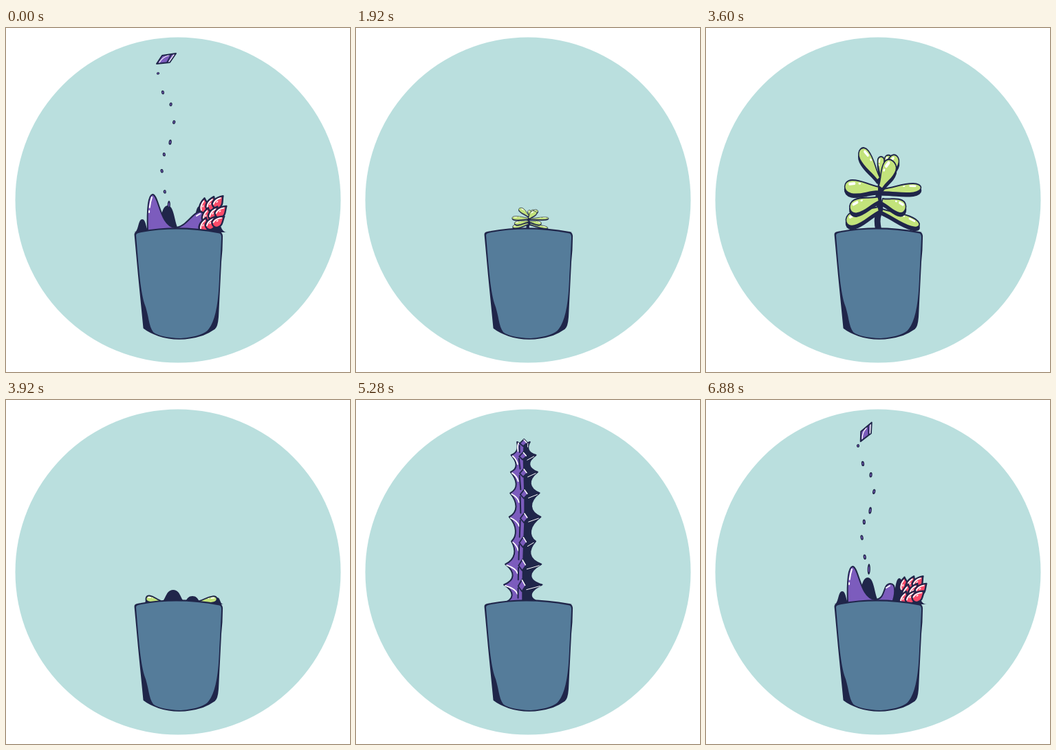
An HTML page with a canvas that plays this animation: 500x500 px, repeating every 6.96 s.

```html
<!DOCTYPE html>
<html lang="en">
<head>
<meta charset="utf-8">
<title>Pot plants</title>
<style>
  html, body { margin: 0; width: 100%; height: 100%; overflow: hidden; background: #fff; }
  canvas { display: block; width: 500px; height: 500px; }
</style>
</head>
<body>
<canvas id="stage" width="500" height="500"></canvas>
<script>
const ctx = document.getElementById('stage').getContext('2d');
const LOOP = 6960, STEP = 80, COUNT = LOOP / STEP;
const INK = '#20264a', RED = '#fb4a68', GREEN = '#c3e37b', PURPLE = '#7c5cbd',
      SKY = '#badfde', POT = '#557c9a', WHITE = '#fff';
const { PI, sin, cos, exp, min, max } = Math;

ctx.lineJoin = ctx.lineCap = 'round';

// ---- easing ----
const clamp = v => min(1, max(0, v));
const smooth = v => (v = clamp(v)) * v * (3 - 2 * v);
const backOut = v => 1 + 2.2 * (v - 1) ** 3 + 1.2 * (v - 1) ** 2;
const spring = n => 1 - exp(-.31 * n) * cos(PI * n / 4);
const swell = (q, from, to) => max(0, sin(PI * clamp((q - from) / (to - from))));

// ---- drawing helpers ----
function paint(fill, stroke, width = 2, path) {
  const args = path ? [path] : [];
  if (fill) { ctx.fillStyle = fill; ctx.fill(...args); }
  if (stroke) { ctx.strokeStyle = stroke; ctx.lineWidth = width; ctx.stroke(...args); }
}

function scaled(sx, sy, y, draw) {
  ctx.save();
  ctx.translate(250, y);
  ctx.scale(sx, sy);
  ctx.translate(-250, -y);
  draw();
  ctx.restore();
}

// Adds a smooth run of points to the current path.
function run(pts) {
  ctx.lineTo(...pts[0]);
  for (let i = 1; i < pts.length - 1; i++) {
    const [x, y] = pts[i], [nx, ny] = pts[i + 1];
    const last = i === pts.length - 2;
    ctx.quadraticCurveTo(x, y, last ? nx : (x + nx) / 2, last ? ny : (y + ny) / 2);
  }
  if (pts.length === 2) ctx.lineTo(...pts[1]);
}

function poly(runs, fill, stroke, width) {
  ctx.beginPath();
  runs.forEach(run);
  ctx.closePath();
  paint(fill, stroke, width);
}

function streak(pts, width, color = WHITE, dash = []) {
  ctx.beginPath();
  run(pts);
  ctx.setLineDash(dash);
  paint(null, color, width);
  ctx.setLineDash([]);
}

function bump(x, top, half) {
  ctx.beginPath();
  ctx.moveTo(x - half, 297);
  ctx.bezierCurveTo(x - half * .4, 297, x - half * .55, top, x, top);
  ctx.bezierCurveTo(x + half * .55, top, x + half * .4, 297, x + half, 297);
  paint(INK);
}

// ---- red rosette ----
function leaf(x, y, angle, len) {
  if (len < 1) return;
  ctx.save();
  ctx.translate(x, y);
  ctx.rotate(angle);
  if (cos(angle) < 0) ctx.scale(1, -1);
  ctx.scale(len, len);
  ctx.beginPath();
  ctx.moveTo(-.52, 0);
  ctx.bezierCurveTo(-.5, -.45, .1, -.5, .7, -.2);
  ctx.bezierCurveTo(.4, .05, .25, .48, -.2, .4);
  ctx.bezierCurveTo(-.4, .36, -.52, .2, -.52, 0);
  paint(RED, INK, 2.4 / len);
  streak([[-.36, -.14], [0, -.36], [.42, -.18]], 1.8 / len);
  streak([[-.05, -.1], [.05, -.11]], 1.5 / len);
  ctx.restore();
}

// Rings of leaves from the rim of the dome to its front.
function rosette(grow) {
  const fill = max(0, grow(235));
  ctx.beginPath();
  ctx.ellipse(250, 297, 61 * fill, 60 * fill, 0, PI, 0);
  paint(INK);
  for (let ring = 0; ring < 5; ring++) {
    const size = 1 - .21 * ring, n = 13 - 2.6 * ring;
    for (let j = 0; j < Math.round(n); j++) {
      const turn = PI * (j + .5) / Math.round(n);
      const x = 250 + 57 * size * cos(turn), up = 4 + 58 * size * sin(turn);
      const g = grow(x);
      leaf(x, 296 - up * g, -turn + .5 * sin(j * 2.4 + ring), (20.5 - up * .12) * g);
    }
  }
}

// The first leaves, packed like a bud on the right of the rim.
function bud(tall) {
  bump(299, 296 - 24 * tall, 22);
  for (let row = 0; row < 3; row++)
    for (let i = 0; i < 3; i++)
      leaf(288 + 10 * i + 4 * (row % 2), 296 - (26 - 10 * row + 2 * i) * tall,
           -1.25 + .3 * i + .1 * row, 17);
}

function drawRed(q) {
  if (q === 86) bud(1);
  else if (q === 0) bud(1.4);
  else if (q < 22) {
    const sy = q < 8 ? 1 + .06 * sin(PI * q / 4) : 1 - smooth((q - 17) / 5);
    const grow = x => backOut(clamp((q + 1.5 - (320 - x) / 46) / 4));
    scaled(1, sy, 296, () => rosette(grow));
  }
}

// ---- green jade ----
function pad(x, y, angle, len, w) {
  const side = cos(angle) < 0 ? 1 : -1;
  [4, 0].forEach(drop => {
    ctx.save();
    ctx.translate(x, y + drop);
    ctx.rotate(angle);
    ctx.beginPath();
    ctx.moveTo(0, -.15 * w);
    ctx.bezierCurveTo(.35 * len, -.25 * w, .5 * len, -.58 * w, .8 * len, -.5 * w);
    ctx.bezierCurveTo(1.07 * len, -.42 * w, 1.07 * len, .42 * w, .8 * len, .5 * w);
    ctx.bezierCurveTo(.5 * len, .58 * w, .35 * len, .25 * w, 0, .15 * w);
    ctx.closePath();
    paint(drop ? INK : GREEN, INK, 1.8);
    if (!drop) {
      streak([[.72 * len, side * .26 * w], [.86 * len, side * .2 * w]], w * .2);
      streak([[.55 * len, side * .28 * w], [.58 * len, side * .28 * w]], w * .13);
    }
    ctx.restore();
  });
}

// Opposite pairs of pads up the stem, closed by a crown of three.
function jade() {
  streak([[251, 294], [247, 280], [255, 265], [249, 252], [256, 238], [254, 222]], 10, INK);
  pad(255, 223, -PI / 2, 25, 11);
  pad(266, 220, -1.5, 24, 13);
  [3, 2, 0, 1].forEach(level => {
    const y = 266 - 13 * level, droop = .3 - .045 * level ** 3, odd = level % 2;
    pad(251, y, PI - droop, 56 - 7 * odd, 18);
    pad(257, y + 2, droop, 64 - 24 * odd, 12 + 5 * odd);
  });
  pad(254, 238, -1.04, 40, 22);
}

function drawJade(q) {
  const n = q - 23.4;
  if (n < 0 || q > 48) return;
  const s = spring(n), sunk = smooth((q - 45) / 4);
  const sx = .88 * clamp(.3 + n / 5) / max(s, .88) + .14 * sunk;
  scaled(sx, 1.116 * s * (1 - sunk), 292, jade);
}

function drawSoil(q) {
  const k = swell(q, 18, 24) + swell(q, 46, 52);
  if (!k) return;
  bump(243, 296 - 20 * k, 24);
  bump(271, 296 - 11 * k, 19);
  bump(307, 296 - 9 * k, 9);
  if (q === 49 || q === 50) {
    pad(224, 293, PI + .25, 21, 9);
    pad(280, 294, -.2, 27, 9);
  }
}

// ---- purple column ----
const FRONT_L = [[174, 39], [190, 88], [228, 185], [238, 235], [246, 293]];
const FRONT_R = [[248, 293], [258, 250], [266, 192], [252, 90], [231, 40]];
const FAR_R = [[248, 28], [250, 62], [259, 100], [259, 140]];
const LOW_R = [[265, 190], [270, 240], [275, 293]];
const LOW_L = [[228, 293], [231, 240], [229, 190]];
const LID = [[174, 39], [194, 31], [248, 28], [231, 40]];

function drawColumn(q) {
  if (q < 50 || q > 62) return;
  const k = smooth((q - 49.5) / 7.5), lean = max(-6, 55 * cos(PI * (q - 54) / 12));
  const map = (pts, dx = 0) =>
    pts.map(([x, y]) => [x + dx + lean * ((292 - y) / 264) ** 2, 292 - (292 - y) * k]);
  const left = map(FRONT_L), right = map(FRONT_R);
  poly([map(FAR_R), map(LOW_R), right], INK, INK);
  poly([left, map(LOW_L)], PURPLE, INK);
  poly([left, right], PURPLE, INK);
  poly(map(LID).map(p => [p]), PURPLE, INK);
  streak(map(FRONT_L.slice(0, 4), 4), 3.5, WHITE, [9 * k, 46 * k, 13 * k, 50 * k]);
  streak(map(LOW_L, 3), 2, WHITE, [9, 14]);
  streak(map([[245, 278], [241, 246]]), 2);
  streak(map([[233, 38], [245, 31]]), 2);
}

// ---- spiky cactus ----
// Every fifth whorl of spikes is a small one.
const WHORLS = Array.from({ length: 9 }, (_, i) => ({
  y: 69 + 28 * i - 18 * sin(PI * i / 5) * (1 - i / 10),
  x: 229 + 11 * smooth(i / 4.5),
  reach: 14 + 1.4 * i - (i % 5 ? 0 : 6)
}));

function drawCactus(q) {
  if (q < 63 || q > 84) return;
  const n = q - 63, out = q - 79, neck = 5.5;
  const k = 1 + .14 * exp(-.5 * n) + .16 * smooth(out / 4);
  const lean = 75 * sin(PI * (n - .8) / 2.4) * exp(-(((n - 2) / 1.6) ** 2));
  const wide = (1 + .9 * exp(-.7 * n)) * (1 - smooth(out / 6));
  const spike = clamp(.3 + .25 * n) - .15 * max(0, out);
  const thin = min(1, wide);

  const at = (x, y) => [x + lean * ((292 - y) / 220) ** 2, 292 - (292 - y) * k];
  const spine = (w, dx = 0, dy = 0) => at(w.x + dx * wide, w.y + dy);
  const tip = (w, side) =>
    spine(w, side * (neck + (w.reach * (side < 0 ? .95 : 1.15) - neck) * spike), -1);
  const edge = side => WHORLS.forEach((w, i) => {
    if (!i) return ctx.lineTo(...tip(w, side));
    const p = WHORLS[i - 1], gap = w.y - p.y, waist = side * (neck + i * .35);
    ctx.bezierCurveTo(...spine(p, waist, gap * .35), ...spine(w, waist, -gap * .25), ...tip(w, side));
  });

  [1, -1].forEach(side => {
    ctx.beginPath();
    ctx.moveTo(...spine(WHORLS[0], 0, 3));
    edge(side);
    [...WHORLS].reverse().forEach(w => ctx.lineTo(...spine(w, 2, 3)));
    ctx.closePath();
    paint(side < 0 ? PURPLE : INK, INK, 2);
  });

  WHORLS.slice(0, -1).forEach((w, i) => {
    const next = WHORLS[i + 1], h = 5 + i * .5;
    const [lx, ly] = tip(w, -1), [rx, ry] = tip(w, 1);
    streak([[lx + 2, ly + 1.5], spine(w, -7, 5), spine(w, -5, 12)], 1.8 * thin);
    streak([spine(w, -4, 4), spine(next, -4, -h)], 2, INK);
    streak([[rx - 3, ry + 2], spine(w, 7, 6)], 1 * thin);
    poly([[spine(w, 1, -h)], [spine(w, 6, 0)], [spine(w, 1, h)], [spine(w, -4, 1)]], PURPLE, INK, 1.8);
    streak([spine(w, 1, 1 - h), spine(w, 5, 0)], 1.5 * thin);
  });
}

// ---- splash and drops ----
function drawDrops(n) {
  if (n < -4 || n > 7) return;
  const fall = y => y + .06 * (y - 75) * n + (n > 0 ? 4.6 * n * n : 0);
  for (let i = 0; i < 9; i++) {
    const x = 234 - 13 * cos(PI * i / 3) * (1 - i / 14), y = fall(66 + 24 * i + 4 * sin(i * 2));
    const long = (i % 4 ? 2.8 : 1.8 + i * .5) * (1 - .35 * min(0, n));
    if (y > 288) continue;
    [[2.1, long, INK], [.8, long * .55, PURPLE]].forEach(([w, h, color]) => {
      ctx.beginPath();
      ctx.ellipse(x, y, w, h, -.2 * cos(i), 0, 2 * PI);
      paint(color);
    });
  }
  ctx.save();
  ctx.translate(233, fall(45));
  ctx.rotate(n * .55);
  poly([[[-14, 7]], [[-6, -5]], [[14, -8]], [[5, 5]]], PURPLE, INK, 2);
  streak([[-10, 5], [-5, -3], [3, -5]], 1.2);
  streak([[1, 5], [7, -6]], 1.6, INK);
  streak([[4, 4], [11, -6]], 1.3);
  ctx.restore();
}

function drawSplash(n) {
  const k = n < 0 ? smooth((n + 5) / 4) : 1 - smooth(n / 4);
  if (!k) return;
  const at = y => 297 - (297 - y) * k, px = 268 + 15 * clamp(n + 1);
  bump(198, at(278), 12);
  bump(235, at(258), 22);
  bump(281, at(259), 14);
  ctx.beginPath();
  ctx.moveTo(206, 297);
  ctx.bezierCurveTo(205, at(270), 206, at(243), 213, at(242));
  ctx.bezierCurveTo(222, at(242), 224, at(289), 246, at(290));
  ctx.bezierCurveTo(262, at(290), px - 12, at(267), px, at(267));
  ctx.bezierCurveTo(px + 9, at(267), px + 7, at(284), px + 2, 297);
  paint(PURPLE, INK, 2);
  streak([[208, at(268)], [209, at(255)], [212, at(246)]], 2, WHITE, [2, 5, 30, 9]);
  streak([[px - 6, at(273)], [px - 1, at(270)]], 2);
}

// ---- pot ----
const potShell = new Path2D('M187.5 300Q187 297 196 296Q250 286 310 297Q315 298 314 306' +
  'Q314 322 312 340L308 420Q307 434 303 437Q296 442 286 446Q252 457 222 447Q208 442 200.5 436Q197 400 193 360Z');
const potFace = new Path2D('M189 301Q189 298 197 297Q250 287.500 310 298.500Q313.500 299 313 306L309.500 375' +
  'Q307 421 295 437Q288 448 254 451Q224 450 214 442C207 433 208 418 201 400C195 378 193 350 189 301Z');

function drawPot() {
  paint(INK, INK, 2, potShell);
  paint(POT, null, 0, potFace);
}

function draw(q) {
  const n = q > 80 ? q - COUNT : q;
  ctx.fillStyle = WHITE;
  ctx.fillRect(0, 0, 500, 500);
  ctx.beginPath();
  ctx.arc(250, 250, 236.5, 0, 2 * PI);
  paint(SKY);
  [drawSoil, drawJade, drawColumn, drawCactus].forEach(part => part(q));
  drawSplash(n);
  drawDrops(n);
  drawRed(q);
  drawPot();
}

const start = performance.now();
let shown = -1;
function tick(now) {
  const q = Math.floor((max(0, now - start) % LOOP) / STEP);
  if (q !== shown) draw(shown = q);
  requestAnimationFrame(tick);
}
draw(0);
requestAnimationFrame(tick);
</script>
</body>
</html>
```
